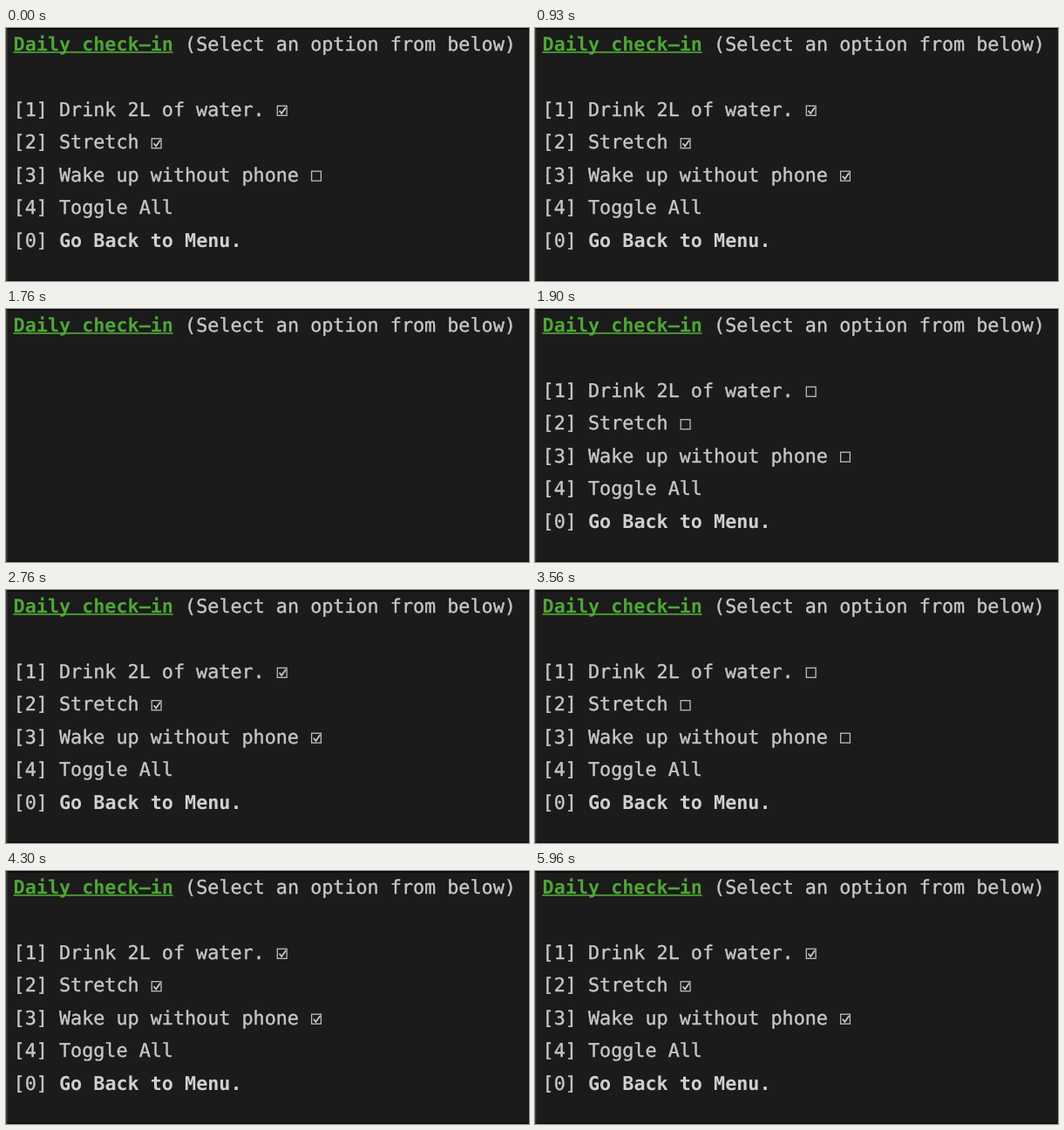
Animation, 600 px wide and 290 px high, one loop 6000 ms. Source, as an HTML page:

```html
<!DOCTYPE html>
<html lang="en">
<head>
<meta charset="utf-8">
<title>Daily check-in</title>
<style>
  html, body { margin: 0; width: 100%; height: 100%; overflow: hidden; background: #1b1b1b; }
  svg { display: block; width: 100vw; height: 100vh; }
  text {
    font: 21.76px "DejaVu Sans Mono", monospace; white-space: pre;
    fill: #c6c6c6; stroke: #c6c6c6; stroke-width: 0.4; text-rendering: geometricPrecision;
  }
  .bold { font-weight: bold; fill: #d0d0d0; stroke: none; }
  .title { font-weight: bold; fill: #4ea635; stroke: none; }
  .box { fill: none; stroke: #bdbdbd; stroke-width: 1.3; }
  .tick { fill: none; stroke: #c8c8c8; stroke-width: 1.8; }
</style>
</head>
<body>
<svg id="stage" viewBox="0 0 600 290">
  <rect width="600" height="290" fill="#1b1b1b"/>
  <rect width="600" height="1.6" fill="#080808"/>
  <rect y="288.5" width="600" height="1.5" fill="#111"/>
  <rect width="1.4" height="290" fill="#404040"/>
  <g id="menu"></g>
</svg>
<script>
const LOOP = 6000;
const LEFT = 8.6, ADVANCE = 13.1, BASELINE = 25.9, LINE = 37.45;

// Each step: start time, menu shown, ticks of the three tasks.
const STEPS = [
  [0, true, [1, 1, 0]],
  [660, true, [1, 1, 1]],
  [1760, false, [0, 0, 0]],
  [1800, true, [0, 0, 0]],
  [2330, true, [1, 1, 1]],
  [2900, true, [0, 0, 0]],
  [3600, false, [1, 1, 1]],
  [3630, true, [1, 1, 1]]
];

const stage = document.getElementById("stage");
const menu = document.getElementById("menu");

function add(parent, tag, attributes, content = "") {
  const node = document.createElementNS("http://www.w3.org/2000/svg", tag);
  for (const key in attributes) node.setAttribute(key, attributes[key]);
  node.textContent = content;
  return parent.appendChild(node);
}

const columnX = column => LEFT + column * ADVANCE;
const rowY = row => BASELINE + row * LINE;

function write(parent, row, column, content, style = "") {
  add(parent, "text", { x: columnX(column), y: rowY(row), class: style }, content);
}

function addCheckbox(row, column) {
  const x = columnX(column) + 1.4, y = rowY(row) - 11.5;
  add(menu, "rect", { x, y, width: 10.8, height: 11, class: "box" });
  return add(menu, "path", {
    d: `M${x + 2.3} ${y + 5.5}l2.6 3.2l4.8 -7`, class: "tick"
  });
}

write(stage, 0, 0, "Daily check–in", "title");
add(stage, "rect", { x: 8.4, y: 26.9, width: 183.2, height: 1.7, fill: "#4ea635" });
write(stage, 0, 15, "(Select an option from below)");

const ticks = ["Drink 2L of water.", "Stretch", "Wake up without phone"].map((task, i) => {
  write(menu, i + 2, 0, `[${i + 1}] ${task}`);
  return addCheckbox(i + 2, task.length + 5);
});
write(menu, 5, 0, "[4] Toggle All");
write(menu, 6, 0, "[0]");
write(menu, 6, 4, "Go Back to Menu.", "bold");

function draw(time) {
  const [, shown, done] = STEPS.findLast(([start]) => start <= time);
  menu.style.display = shown ? "" : "none";
  ticks.forEach((tick, i) => { tick.style.display = done[i] ? "" : "none"; });
}

const begin = performance.now();
function play() {
  draw((performance.now() - begin) % LOOP);
  requestAnimationFrame(play);
}
play();
</script>
</body>
</html>
```
